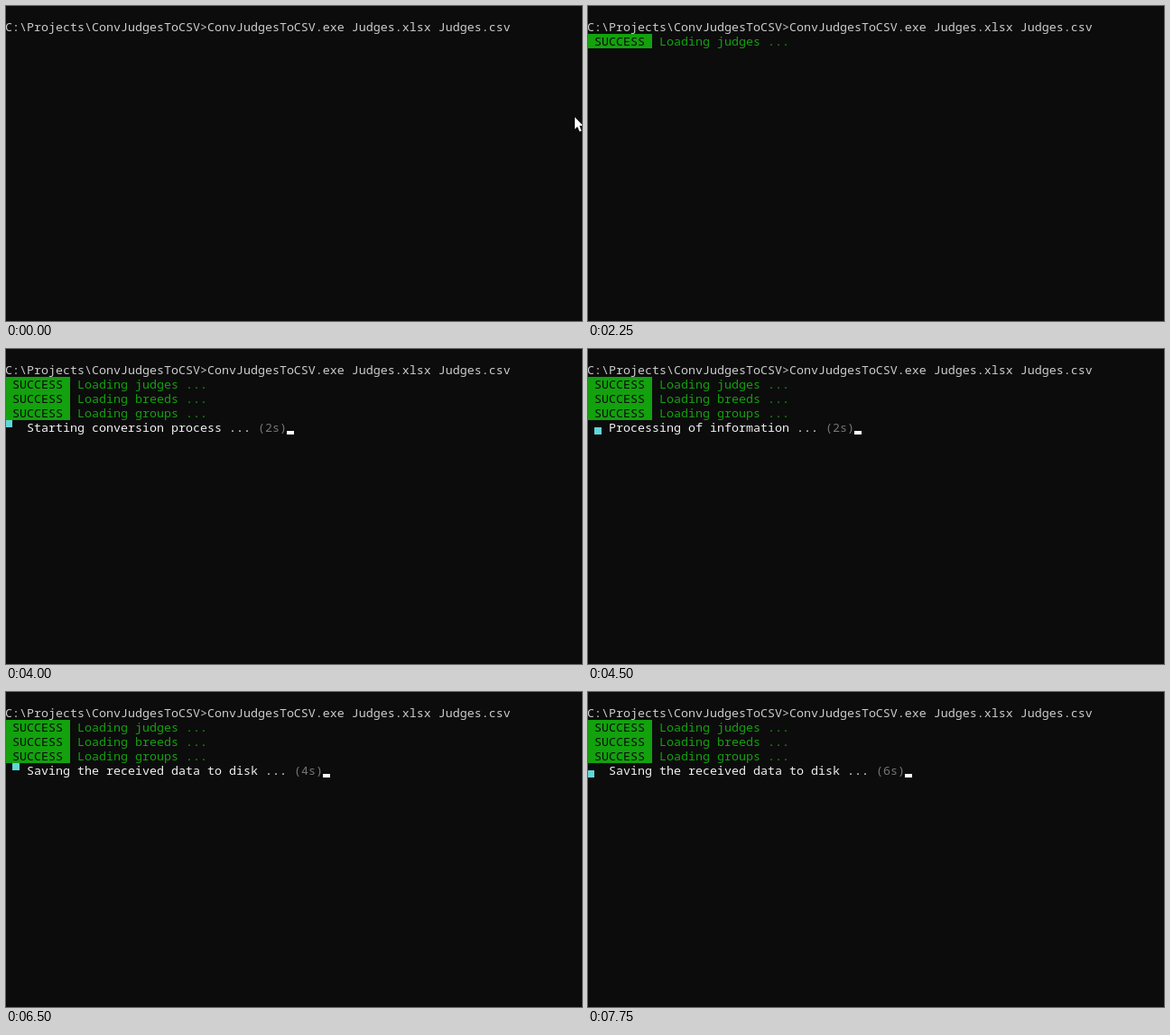
Write an HTML page that moves like this. It is 638x350 px and loops after 8 s.

```html
<!DOCTYPE html>
<html lang="en">
<head>
<meta charset="utf-8">
<title>Console conversion</title>
<style>
  html, body { margin: 0; width: 100%; height: 100%; overflow: hidden; background: #0c0c0c; }
  svg { display: block; width: 638px; height: 350px; }
  text { font: 13.3333px "Noto Sans Mono", "Liberation Mono", monospace; white-space: pre; }
</style>
</head>
<body>
<svg id="stage" viewBox="0 0 638 350"></svg>
<script>
const LOOP = 8000, TICK = 250;
const CELL = 8, LINE = 16, LEFT = -1, TOP = 15;
const DARK = '#0c0c0c', GREY = '#cccccc', GREEN = '#13a10e',
      WHITE = '#f2f2f2', DIM = '#767676', CYAN = '#61d6d6';

const stage = document.getElementById('stage');
const colX = col => LEFT + col * CELL;
const rowY = row => TOP + row * LINE;

function add(parent, tag, attrs) {
  const el = document.createElementNS('http://www.w3.org/2000/svg', tag);
  for (const key in attrs) el.setAttribute(key, attrs[key]);
  return parent.appendChild(el);
}

function write(parent, col, row, fill, value = '') {
  const el = add(parent, 'text', { x: colX(col), y: rowY(row) + 13, fill });
  el.textContent = value;
  return el;
}

const show = (el, on) => el.setAttribute('visibility', on ? 'visible' : 'hidden');

function place(el, col, y) {
  el.setAttribute('x', colX(col));
  el.setAttribute('y', y);
}

add(stage, 'rect', { width: 638, height: 350, fill: DARK });

const command = 'C:\\Projects\\ConvJudgesToCSV>ConvJudgesToCSV.exe Judges.xlsx Judges.csv';
write(stage, 0, 0, GREY, command);

const loads = [['judges', 2000], ['breeds', 2500], ['groups', 2500]].map(([item, start], i) => {
  const group = add(stage, 'g', {});
  add(group, 'rect', { x: LEFT, y: rowY(i + 1), width: 9 * CELL, height: LINE, fill: GREEN });
  write(group, 1, i + 1, DARK, 'SUCCESS');
  write(group, 10, i + 1, GREEN, `Loading ${item} ...`);
  return { group, start };
});

const stages = [
  [6500, 'Saving the received data to disk ...'],
  [4500, 'Processing of information ...'],
  [2500, 'Starting conversion process ...']
];
const status = write(stage, 3, 4, WHITE);
const elapsed = write(stage, 3, 4, DIM);
const spinner = add(stage, 'rect', { width: CELL, height: 8, fill: CYAN });
const caret = add(stage, 'rect', { width: CELL, height: 4, fill: '#ffffff' });
const pointer = add(stage, 'path', {
  d: 'M630 123.5V136.8L633 134L635.3 139.6L637.5 138.7L635.2 133.1H639.3Z',
  fill: '#ffffff'
});

// Spinner runs clockwise: column, then upper or lower half.
const corners = [[0, 1], [0, 0], [1, 0], [1, 1]];

function caretCell(t) {
  if (t >= 1250 && t < 1750) return [command.length, 0];
  if (t >= 1750 && t < 2000) return [0, 1];
  if (t >= 2000 && t < 2250) return [0, 2];
  return null;
}

function render(time) {
  const t = Math.floor((time % LOOP) / TICK) * TICK;
  show(pointer, t < 250);
  for (const { group, start } of loads) show(group, t >= start);

  const current = stages.find(([start]) => t >= start);
  for (const el of [status, elapsed, spinner]) show(el, current);

  let cell = caretCell(t);
  if (current) {
    const label = current[1];
    const count = `(${Math.floor((t - 1755) / 999)}s)`;
    const countCol = 3 + label.length + 1;
    status.textContent = label;
    elapsed.textContent = count;
    elapsed.setAttribute('x', colX(countCol));

    const step = Math.floor((t - 3000) / 195 + 0.18);
    const [col, half] = corners[((step % 4) + 4) % 4];
    place(spinner, col, rowY(4) + half * 8);
    cell = [countCol + count.length, 4];
  }

  show(caret, cell);
  if (cell) place(caret, cell[0], rowY(cell[1]) + 12);
}

const began = performance.now();
function frame() {
  render(performance.now() - began);
  requestAnimationFrame(frame);
}
render(0);
requestAnimationFrame(frame);
</script>
</body>
</html>
```
